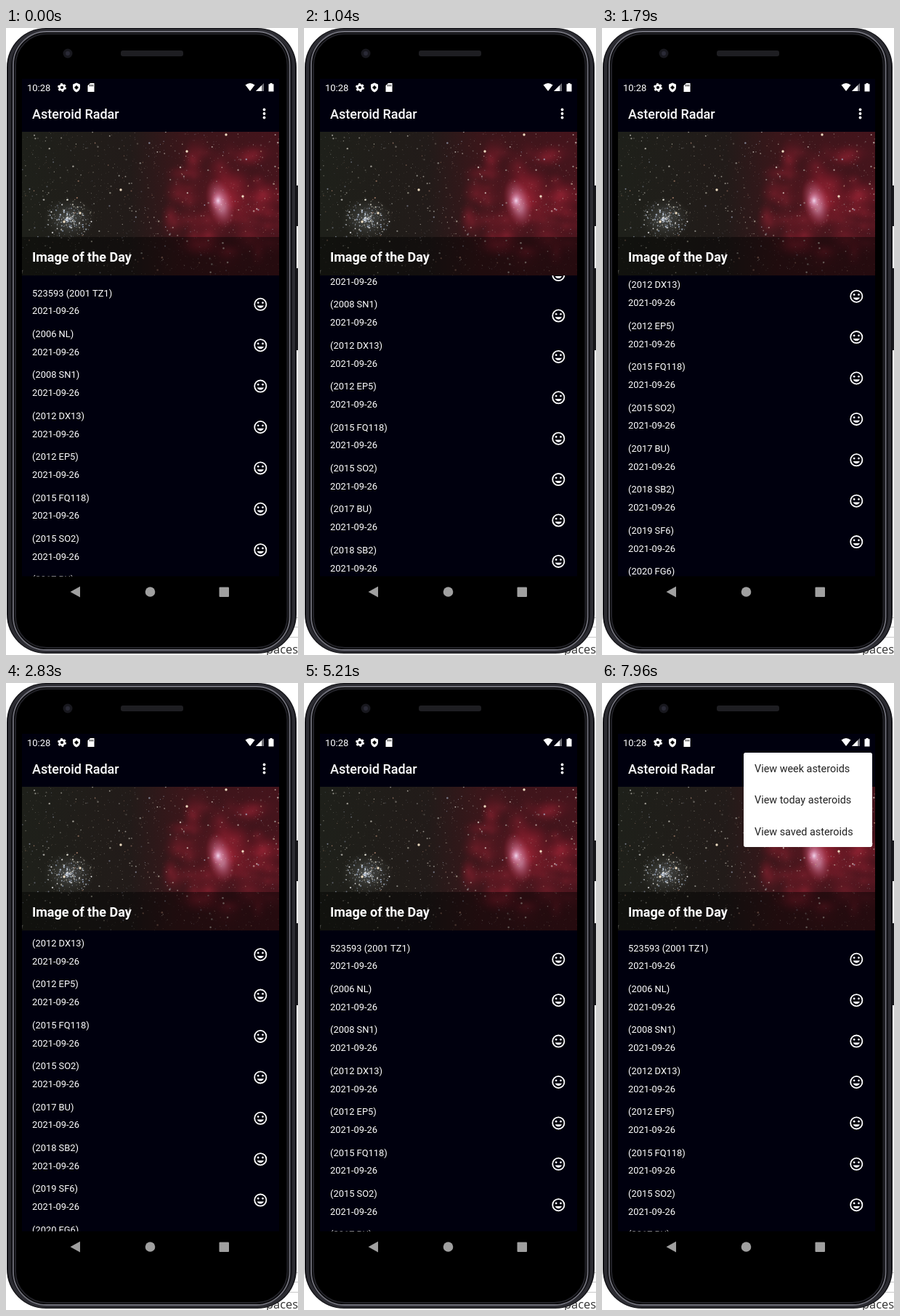
Write an HTML page that moves like this. It is 402x864 px and loops after 8 s.

```html
<!DOCTYPE html>
<html lang="en">
<head>
<meta charset="utf-8">
<title>Asteroid Radar</title>
<style>
  html, body { margin: 0; width: 100%; height: 100%; overflow: hidden; background: #fff; }
  svg { display: block; width: 402px; height: 864px; }
  text { font-family: Roboto, sans-serif; fill: #fff; }
  .row { font-size: 12.9px; }
  .head { font-size: 18px; font-weight: 500; }
  .menu text { font-size: 14.4px; fill: #222; }
</style>
</head>
<body>
<svg viewBox="0 0 402 864">
  <defs>
    <linearGradient id="sky" x2="1" y2="0">
      <stop offset="0" stop-color="#1e201a"/>
      <stop offset=".42" stop-color="#221b19"/>
      <stop offset=".62" stop-color="#3a161a"/>
      <stop offset="1" stop-color="#45141c"/>
    </linearGradient>
    <radialGradient id="red">
      <stop offset="0" stop-color="#a8283a"/>
      <stop offset=".5" stop-color="#7a1a28" stop-opacity=".6"/>
      <stop offset="1" stop-color="#4a141c" stop-opacity="0"/>
    </radialGradient>
    <radialGradient id="core">
      <stop offset="0" stop-color="#f4d4ec"/>
      <stop offset=".4" stop-color="#d080a0" stop-opacity=".75"/>
      <stop offset="1" stop-color="#a83048" stop-opacity="0"/>
    </radialGradient>
    <radialGradient id="haze">
      <stop offset="0" stop-color="#80888c" stop-opacity=".45"/>
      <stop offset="1" stop-color="#50544c" stop-opacity="0"/>
    </radialGradient>
    <clipPath id="photoBox"><rect x="22" y="143" width="354" height="198"/></clipPath>
    <clipPath id="listBox"><rect x="22" y="341" width="354" height="414.5"/></clipPath>
    <clipPath id="reveal"><rect id="revealBox" rx="2"/></clipPath>
    <g id="face" transform="scale(.9) translate(-12 -12)" fill="#fff">
      <circle cx="12" cy="12" r="9" fill="none" stroke="#fff" stroke-width="2"/>
      <circle cx="8.5" cy="9.5" r="1.5"/>
      <circle cx="15.5" cy="9.5" r="1.5"/>
      <path d="M12 17.5c2.33 0 4.31-1.46 5.11-3.5H6.89c.8 2.04 2.78 3.5 5.11 3.5z"/>
    </g>
  </defs>

  <!-- page behind the phone -->
  <rect width="402" height="864" fill="#fff"/>
  <path d="M380 812.5h22M380 825.5h22M370 839.5h32" stroke="#c8c8c8"/>
  <text x="358" y="862" style="font:16.4px 'Open Sans',sans-serif;fill:#333">paces</text>

  <!-- phone -->
  <path d="M399 217h3v56h-3zM399 331h3v113h-3z" fill="#18181c"/>
  <rect x="1" y="0" width="399" height="862" rx="54" fill="#121216"/>
  <rect x="5" y="3" width="391" height="856" rx="50" fill="none" stroke="#2c2c32" stroke-width="4"/>
  <rect x="10" y="5" width="380.500" height="852" rx="46" fill="#000" stroke="#70707a" stroke-width="1.800"/>
  <rect x="13" y="8" width="374.500" height="846" rx="43" fill="#000" stroke="#222228" stroke-width="2"/>
  <circle cx="85" cy="35" r="6.500" fill="#18181e"/>
  <circle cx="85" cy="35" r="3" fill="#2a2a36"/>
  <rect x="158" y="31" width="86" height="8" rx="3" fill="#1e1e22"/>
  <rect x="22" y="70" width="354" height="685.500" fill="#00000e"/>

  <!-- status bar -->
  <text x="29" y="86.5" font-size="13">10:28</text>
  <g fill="#fff">
    <circle cx="77" cy="82" r="3.4" fill="none" stroke="#fff" stroke-width="2.6"/>
    <circle cx="77" cy="82" r="5" fill="none" stroke="#fff" stroke-width="2" stroke-dasharray="2.6 2.636"/>
    <path d="M97 75.5l5 2.2v4c0 3.2-2.2 5.7-5 6.8c-2.8-1.1-5-3.6-5-6.8v-4z"/>
    <path d="M97 79l3 3-3 3-3-3z" fill="#000"/>
    <path d="M116 76h5.5v12h-9v-8.5z"/>
    <path d="M115.5 78v2.5M117.5 78v2.5M119.5 78v2.5" stroke="#000" stroke-width=".9"/>
    <path d="M329.5 78.5q6.5-5 13 0l-6.5 8.5z"/>
    <path d="M355 76v11h-11z" opacity=".45"/>
    <path d="M352 79v8h-8z"/>
    <path d="M363.5 76h3v1.3h2v10.2h-7v-10.2h2z"/>
  </g>

  <!-- toolbar -->
  <text class="head" x="36" y="125">Asteroid Radar</text>
  <g fill="#fff">
    <circle cx="355.5" cy="112.5" r="1.9"/>
    <circle cx="355.5" cy="118" r="1.9"/>
    <circle cx="355.5" cy="123.5" r="1.9"/>
  </g>

  <!-- picture -->
  <g clip-path="url(#photoBox)">
    <rect x="22" y="143" width="354" height="198" fill="url(#sky)"/>
    <g id="clouds"></g>
    <ellipse cx="302" cy="232" rx="48" ry="56" fill="url(#red)" opacity=".7"/>
    <ellipse cx="87" cy="263" rx="36" ry="30" fill="url(#haze)"/>
    <ellipse cx="295" cy="241" rx="19" ry="36" fill="url(#core)" transform="rotate(-14 295 241)" opacity=".8"/>
    <ellipse cx="292" cy="238" rx="11" ry="15" fill="url(#core)"/>
    <g id="stars"></g>
    <rect x="22" y="288" width="354" height="53" fill="#000" opacity=".45"/>
  </g>
  <text class="head" x="36" y="321.5" style="font-weight:700">Image of the Day</text>

  <g clip-path="url(#listBox)"><g id="list"></g></g>

  <!-- navigation bar -->
  <g fill="#a0a0a0">
    <path d="M88.5 777l13.5-7.5v15z"/>
    <circle cx="198.5" cy="777" r="6.8"/>
    <rect x="293.5" y="770.5" width="13.5" height="13.5" rx="1"/>
  </g>

  <g id="popup" clip-path="url(#reveal)">
    <g id="menu" class="menu">
      <rect x="195" y="96" width="177" height="130" rx="2" fill="#fff"/>
    </g>
  </g>
</svg>

<script>
const LOOP = 8000, PITCH = 56.4;
const $ = id => document.getElementById(id);

function add(parent, tag, attrs, text) {
  const el = document.createElementNS('http://www.w3.org/2000/svg', tag);
  for (const k in attrs) el.setAttribute(k, attrs[k]);
  if (text) el.textContent = text;
  parent.append(el);
  return el;
}

let seed = 41;
const rnd = () => (seed = seed * 16807 % 2147483647) / 2147483647;
const pick = list => list[Math.floor(rnd() * list.length)];

// Mottled red nebula on the right
for (let i = 0; i < 60; i++) {
  const a = rnd() * Math.PI * 2, d = rnd() ** .7;
  add($('clouds'), 'ellipse', {
    cx: 305 + Math.cos(a) * d * 85, cy: 240 + Math.sin(a) * d * 80,
    rx: 14 + rnd() * 24, ry: 12 + rnd() * 20, fill: 'url(#red)', opacity: .15 + rnd() * .3
  });
}

// Star field with a dense cluster on the left
function star(cx, cy, r, fill, opacity) {
  add($('stars'), 'circle', { cx, cy, r, fill, opacity });
}
for (let i = 0; i < 1300; i++)
  star(22 + rnd() * 354, 143 + rnd() * 198, .35 + rnd() ** 5 * .95,
    pick(['#d8d4c0', '#b8b8b0', '#c89880', '#a8b0c8', '#f0ece0']), .2 + rnd() * .55);
for (let i = 0; i < 260; i++) {
  const a = rnd() * Math.PI * 2, d = rnd() ** 1.2;
  star(87 + Math.cos(a) * d * 33, 263 + Math.sin(a) * d * 27, .4 + rnd() ** 3 * .85,
    pick(['#ffffff', '#c8d8f0', '#a8b8d4', '#e8e4d4']), .45 + rnd() * .5);
}
for (const [x, y] of [[326, 232], [102, 255], [80, 267], [303, 147], [158, 223], [249, 170]])
  star(x, y, 1.7, '#f8e8cc', .95);

const names = ['523593 (2001 TZ1)', '(2006 NL)', '(2008 SN1)', '(2012 DX13)', '(2012 EP5)',
  '(2015 FQ118)', '(2015 SO2)', '(2017 BU)', '(2018 SB2)', '(2019 SF6)', '(2020 FG6)'];
names.forEach((name, i) => {
  const y = i * PITCH;
  add($('list'), 'text', { class: 'row', x: 36, y: 369.6 + y }, name);
  add($('list'), 'text', { class: 'row', x: 36, y: 394.4 + y }, '2021-09-26');
  add($('list'), 'use', { href: '#face', x: 350.3, y: 380.8 + y });
});
['week', 'today', 'saved'].forEach((word, i) =>
  add($('menu'), 'text', { x: 210, y: 123 + i * 43.4 }, `View ${word} asteroids`));

// [time, scroll offset]; the finger rests briefly at the start of each drag
const scroll = [[0, 0], [770, 0], [820, 10.2], [880, 10.2], [1000, 75], [1130, 145], [1235, 180.3],
  [2710, 180.3], [2815, 175.8], [2920, 175.8], [3050, 140], [3250, 95], [3420, 95], [3600, 30],
  [3800, 0], [LOOP, 0]];
function sample(track, t) {
  const i = Math.max(1, track.findIndex(k => k[0] >= t));
  const [t0, a] = track[i - 1], [t1, b] = track[i];
  return a + (b - a) * (t - t0) / (t1 - t0);
}

// cubic-bezier(x1, 0, x2, 1)
function ease(x1, x2, t) {
  let lo = 0, hi = 1;
  for (let i = 0; i < 24; i++) {
    const s = (lo + hi) / 2, r = 1 - s;
    if (3 * r * r * s * x1 + 3 * r * s * s * x2 + s * s * s < t) lo = s; else hi = s;
  }
  return lo * lo * (3 - 2 * lo);
}

const OPEN = 6355, GROW = 250, FADE = 88;
const clamp = v => Math.min(1, Math.max(0, v));
const mix = (a, b, p) => a + (b - a) * p;

// The popup grows out of the overflow button while sliding into place
function drawMenu(t) {
  const age = t - OPEN, p = clamp(age / GROW);
  $('popup').style.display = age > 0 ? '' : 'none';
  if (age <= 0) return;
  const px = p < 1 ? ease(0, .2, p) : 1, py = p < 1 ? ease(.4, .2, p) : 1;
  const dx = mix(71.5, 0, px), dy = mix(-43, 0, py);
  const w = mix(40, 177, px), h = mix(43, 130, py);
  const box = { x: 283.5 + dx - w / 2, y: 161 + dy - h / 2, width: w, height: h };
  for (const k in box) $('revealBox').setAttribute(k, box[k]);
  $('menu').setAttribute('transform', `translate(${dx} ${dy})`);
  $('popup').setAttribute('opacity', clamp(age / FADE));
}

function frame() {
  const t = performance.now() % LOOP;
  $('list').setAttribute('transform', `translate(0 ${-sample(scroll, t)})`);
  drawMenu(t);
  requestAnimationFrame(frame);
}
frame();
</script>
</body>
</html>
```
